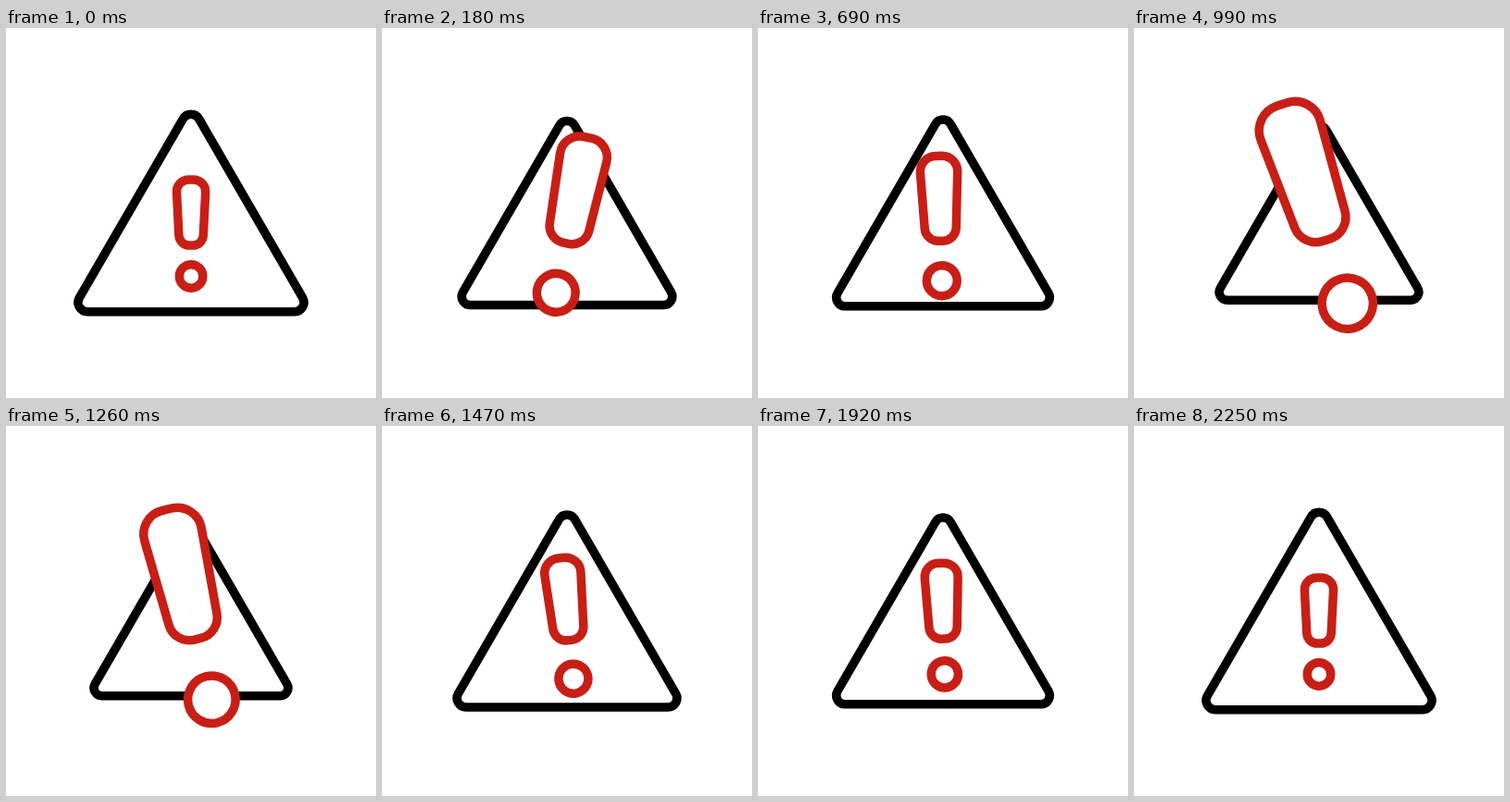
An HTML page that plays this animation: 400x400 px, repeating every 2280 ms.

```html
<!DOCTYPE html>
<html lang="en">
<head>
<meta charset="utf-8">
<title>Warning sign</title>
<style>
  html, body { margin: 0; width: 100%; height: 100%; overflow: hidden; background: #fff; }
  svg { display: block; width: 400px; height: 400px; }
  path, circle { fill: #fff; stroke-width: 9.5px; vector-effect: non-scaling-stroke; }
  #triangle { stroke: #000; }
  #mark { stroke: #c71f16; }
</style>
</head>
<body>
<svg viewBox="0 0 400 400">
  <path id="triangle" d="M79.3 291.7L191.3 98.3A10 10 0 0 1 208.7 98.3L320.7 291.7A10 10 0 0 1 312 306.7H88A10 10 0 0 1 79.3 291.7Z"/>
  <g id="mark">
    <path d="M197.4 163.9H202.6A13 13 0 0 1 215.6 177.6L213.2 224.3A11.4 11.4 0 0 1 201.8 235.1H198.2A11.4 11.4 0 0 1 186.8 224.3L184.4 177.6A13 13 0 0 1 197.4 163.9Z"/>
    <circle cx="200" cy="268.4" r="12.75"/>
  </g>
</svg>
<script>
const LOOP = 2280, STEP = 30;
const triangle = document.getElementById('triangle');
const mark = document.getElementById('mark');

const smooth = u => u * u * (3 - 2 * u);
const clamp = u => Math.min(1, Math.max(0, u));

// Starts at a value, then eases to each value between its start and end time.
const tween = (start, ...moves) => t => {
  let value = start, from = start;
  for (const [begin, end, to] of moves) {
    value += (to - from) * smooth(clamp((t - begin) / (end - begin)));
    from = to;
  }
  return value;
};

// The mark pops out twice, then springs back; all of it shares these beats.
const beats = [0, 375, 690, 1090, 1660, 1920, 2230];
const onBeats = (start, ...values) =>
  tween(start, ...values.map((value, i) => [beats[i], beats[i + 1], value]));

const markScale = onBeats(1, 2.36, 1.29, 2.33, 0.88, 1.15, 1);
const markY = onBeats(222.5, 201.2, 214, 201.2, 221, 215.6, 222.5);
const markAngle = tween(0, [0, 320, 19.2], [320, 1010, -18.3], [1010, 1680, -2], [1920, 2230, 0]);
const triangleScale = tween(1, [0, 370, 0.86], [370, 690, 0.945], [690, 1150, 0.86],
  [1310, 1660, 1.123], [1660, 1920, 0.945], [1920, 2220, 1]);

// The mark drifts sideways with the speed of its swing.
const markX = t => 200 + 1.75 * (markAngle(t + 10) - markAngle(t - 10));

function draw(now) {
  const t = Math.floor(now % LOOP / STEP) * STEP;
  triangle.setAttribute('transform',
    `translate(200 200) scale(${triangleScale(t)}) translate(-200 -200)`);
  mark.setAttribute('transform', `translate(${markX(t)} ${markY(t)}) rotate(${markAngle(t)})
    scale(${markScale(t)}) translate(-200 -222.5)`);
  requestAnimationFrame(draw);
}
draw(0);
</script>
</body>
</html>
```
